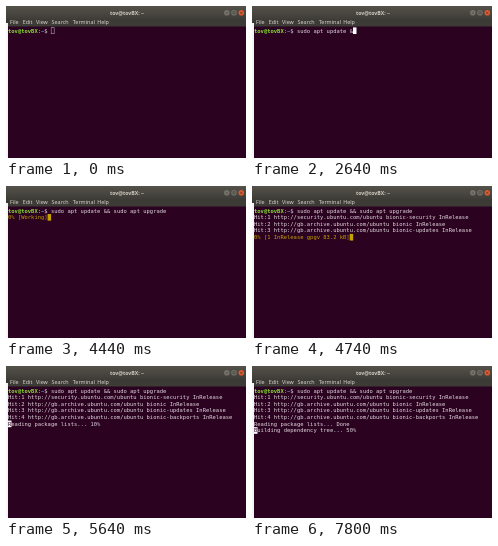
An HTML page with a canvas for the animation above (8000 ms loop, 240 px wide and 152 px high).

```html
<!DOCTYPE html>
<html lang="en">
<head>
<meta charset="utf-8">
<title>Terminal</title>
<style>
html, body { margin: 0; width: 100%; height: 100%; overflow: hidden; background: #2b0220; }
canvas { display: block; }
</style>
</head>
<body>
<canvas id="stage" width="240" height="152"></canvas>
<script>
const ctx = document.getElementById('stage').getContext('2d');
const LOOP = 8000, STEP = 30, LEFT = 2, CELL = 3.3, ROW = 6.63, TOP = 21.4;
const BG = '#2b0220', WHITE = '#fff', TEXT = '#e2d9df', GREEN = '#8ae234', BLUE = '#729fcf', YELLOW = '#c4a000';
const MONO = '"DejaVu Sans Mono", monospace', SANS = '"Noto Sans", "Open Sans", sans-serif';
const USER = 'tov@tovBX', PROMPT = USER + ':~$ ';
const COMMAND = 'sudo apt update && sudo apt upgrade';
const HITS = ['security.ubuntu.com/ubuntu bionic-security', 'gb.archive.ubuntu.com/ubuntu bionic',
  'gb.archive.ubuntu.com/ubuntu bionic-updates', 'gb.archive.ubuntu.com/ubuntu bionic-backports']
  .map((s, i) => `Hit:${i + 1} http://${s} InRelease`);

// Each burst is [start, end, amount]; between bursts the count rests.
const typing = [[690, 720, 1], [930, 1050, 6], [1200, 1230, 2], [1650, 2010, 7], [2610, 2640, 1],
  [2700, 2730, 7], [3240, 3720, 3], [3870, 3990, 3], [4050, 4230, 5]];
const reading = [[5400, 5640, 10], [6060, 6120, 16], [6570, 6720, 25], [7050, 7500, 45]];

const ramp = (t, start, end) => Math.min(1, Math.max(0, (t - start) / (end - start)));
const count = (bursts, t) =>
  Math.floor(bursts.reduce((sum, [start, end, amount]) => sum + amount * ramp(t, start, end), 0));

// Lays text out at ten times its size so that small glyphs keep exact spacing.
function text(str, x, y, size, family, color, weight = 'normal', align = 'left') {
  ctx.save();
  ctx.translate(x, y);
  ctx.scale(.1, .1);
  ctx.font = `${weight} ${size * 10}px ${family}`;
  ctx.fillStyle = color;
  ctx.textAlign = align;
  ctx.fillText(str, 0, 0);
  ctx.restore();
}

function rect(x, y, w, h, color) {
  ctx.fillStyle = color;
  ctx.fillRect(x, y, w, h);
}

const put = (str, col, row, color = TEXT, weight) =>
  text(str, LEFT + col * CELL, TOP + row * ROW + 5.2, 5.48, MONO, color, weight);

function cursor(col, row, color = WHITE, hollow = false) {
  const x = LEFT + col * CELL, y = TOP + row * ROW;
  rect(x, y, CELL + .2, ROW, hollow ? '#c9bdc6' : color);
  if (hollow) rect(x + .5, y + .5, CELL - .8, ROW - 1, BG);
}

function progress(label, percent, row) {
  put(`${label}... ${percent}%`, 0, row);
  cursor(0, row);
  put(label[0], 0, row, BG);
}

function button(x, color, mark) {
  ctx.fillStyle = color;
  ctx.beginPath();
  ctx.arc(x, 6.8, 2.8, 0, 7);
  ctx.fill();
  ctx.strokeStyle = '#3c3b36';
  ctx.lineWidth = .6;
  ctx.stroke(new Path2D(mark));
}

function chrome() {
  const bar = ctx.createLinearGradient(0, 0, 0, 13);
  bar.addColorStop(0, '#54524a');
  bar.addColorStop(1, '#3e3d38');
  rect(0, 0, 240, 13, bar);
  rect(0, 13, 240, 7.5, '#3c3b36');
  rect(0, 17, 2, 135, '#f6f5f6');
  text(USER + ': ~', 121, 8.8, 5.2, SANS, '#cfcbc2', 'bold', 'center');
  let x = 4;
  for (const label of ['File', 'Edit', 'View', 'Search', 'Terminal', 'Help']) {
    text(label, x, 18.3, 5.4, SANS, '#d6d2c9');
    x += ctx.measureText(label).width * .54 + 4;
  }
  button(220.8, '#75726a', 'M219.6 7h2.4');
  button(228, '#75726a', 'M226.9 5.7h2.2v2.2h-2.2z');
  button(235.3, '#e2592b', 'M234.2 5.7l2.2 2.2m0-2.2l-2.2 2.2');
}

function draw(t) {
  rect(0, 0, 240, 152, BG);
  chrome();
  const typed = count(typing, t);
  put(USER, 0, 0, GREEN, 'bold');
  put(':', 9, 0);
  put('~', 10, 0, BLUE, 'bold');
  put('$ ' + COMMAND.slice(0, typed), 11, 0);
  if (t < 4260) return cursor(PROMPT.length + typed, 0, WHITE, t < 60);

  const hits = count([[4380, 4830, 4]], t);
  HITS.slice(0, hits).forEach((line, i) => put(line, 0, i + 1));
  if (t < 5400) {
    const source = 1 + count([[4980, 5190, 3]], t);
    const status = hits ? `0% [${source} InRelease gpgv 83.2 kB]` : '0% [Working]';
    put(status, 0, hits + 1, YELLOW);
    cursor(status.length, hits + 1, YELLOW);
  } else if (t < 7710) {
    progress('Reading package lists', count(reading, t), 5);
  } else {
    put('Reading package lists... Done', 0, 5);
    progress('Building dependency tree', count([[7710, 7800, 50]], t), 6);
  }
}

const start = performance.now();
function tick() {
  const t = (performance.now() - start) % LOOP;
  draw(Math.floor(t / STEP) * STEP);
  requestAnimationFrame(tick);
}
tick();
</script>
</body>
</html>
```
